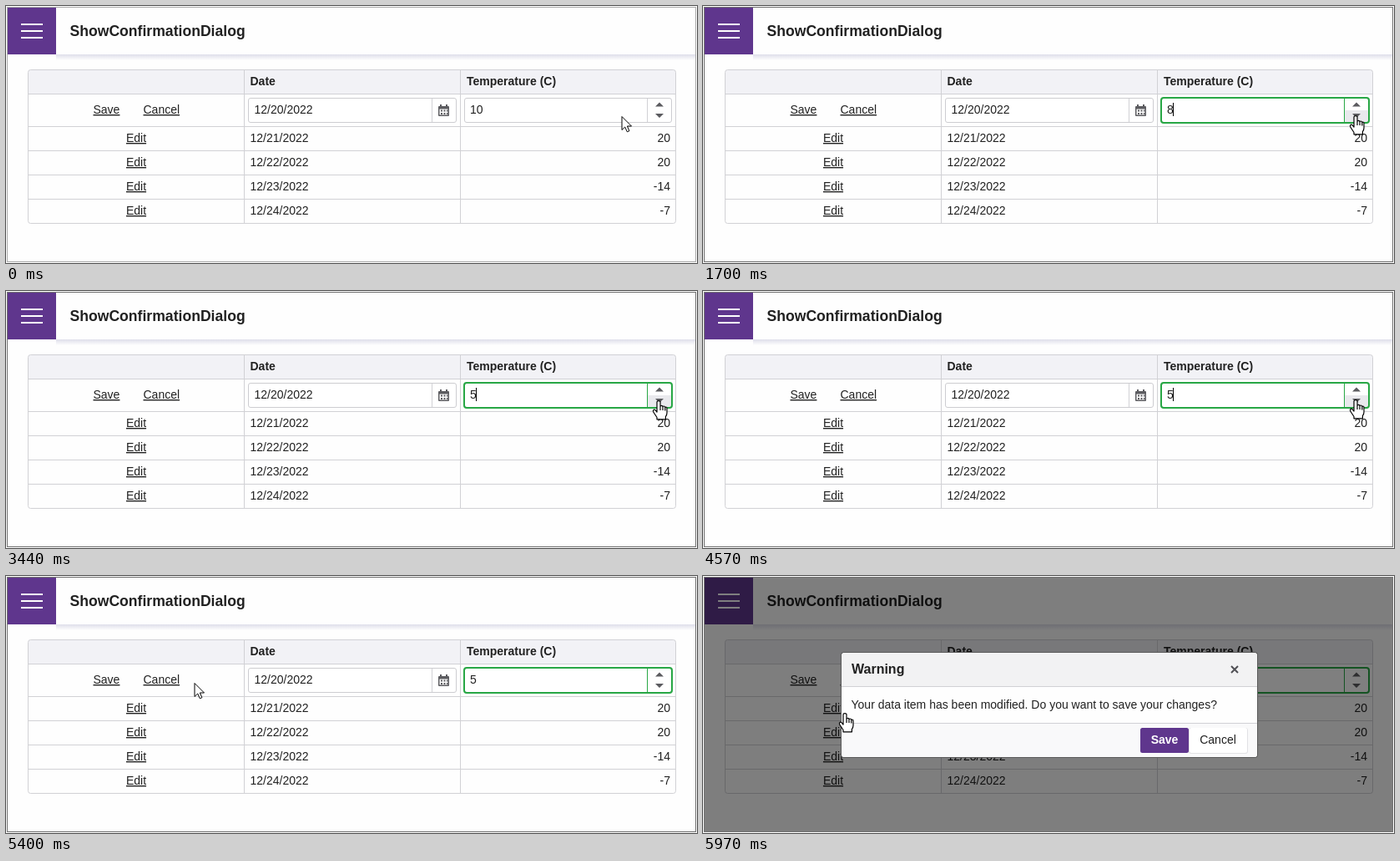
These frames come from a looping animation (828 px wide and 308 px high, 8 s). An HTML page:

```html
<!DOCTYPE html>
<html lang="en">
<head>
<meta charset="utf-8">
<title>ShowConfirmationDialog</title>
<style>
  html, body { margin: 0; width: 100%; height: 100%; overflow: hidden; background: #fff; }
  svg { display: block; }
  text { font: 14px "Liberation Sans", Arial, sans-serif; fill: #212121; white-space: pre; }
  .bold { font-weight: bold; }
  .link { text-decoration: underline; }
  .mid { text-anchor: middle; }
  .end { text-anchor: end; }
  .crisp { shape-rendering: crispEdges; }
  .line { fill: none; stroke: #d1d1d5; }
  .box { fill: #fff; stroke: #cdcdd1; }
  .icon { fill: #5c5c60; }
  .pointer { fill: #fff; stroke: #000; stroke-linejoin: round; }
</style>
</head>
<body>
<svg width="828" height="308" viewBox="0 0 828 308">
  <defs>
    <linearGradient id="shade" x2="0" y2="1">
      <stop offset="0" stop-color="#dedeea"/>
      <stop offset="1" stop-color="#dedeea" stop-opacity="0"/>
    </linearGradient>
  </defs>

  <rect id="frame" class="crisp" x="1.5" y="1.5" width="825" height="305" fill="#fefefe" stroke="#aaa"/>

  <!-- top bar -->
  <rect x="60" y="58" width="766" height="7" fill="url(#shade)"/>
  <rect x="2" y="2" width="58" height="56" fill="#5f368d"/>
  <path class="crisp" d="M18 22H44M18 30H44M18 38H44" stroke="#fff" stroke-width="2"/>
  <text class="bold" x="76.5" y="36" style="font-size:17.6px">ShowConfirmationDialog</text>

  <!-- grid -->
  <path d="M26.5 105V79.5Q26.5 76.5 29.5 76.5H799.5Q802.5 76.5 802.5 79.5V105Z" fill="#f2f2f6"/>
  <rect class="line" x="26.5" y="76.5" width="776" height="184" rx="3"/>
  <path class="line crisp" d="M27 105.5H802M27 144.5H802M27 173.5H802M27 202.5H802M27 231.5H802M285.5 77V260M544.5 77V260"/>
  <text class="bold" x="292.5" y="95">Date</text>
  <text class="bold" x="552" y="95">Temperature (C)</text>
  <g id="rows"></g>

  <!-- edit row -->
  <text class="link" x="104.5" y="129">Save</text>
  <text class="link" x="164.5" y="129">Cancel</text>
  <rect class="box" x="290.5" y="110.5" width="249" height="29" rx="2.5"/>
  <path class="line crisp" d="M510.5 111V139"/>
  <text x="297.5" y="129">12/20/2022</text>
  <g class="icon">
    <path d="M520 118h2v2h5v-2h2v2h1q1 0 1 1v10q0 1-1 1h-11q-1 0-1-1v-10q0-1 1-1h1z"/>
    <path fill="#fff" d="M519.5 123.5h10v7h-10z"/>
    <path d="M521 124.5h2v2h-2zm3.5 0h2v2h-2zm3.5 0h1.5v2h-1.5zM521 128h2v2h-2zm3.5 0h2v2h-2zm3.5 0h1.5v2h-1.5z"/>
  </g>
  <rect class="box" x="549.5" y="110.5" width="248" height="29" rx="2.5"/>
  <path id="hover" d="M769 125H797V137Q797 139 795 139H769Z" fill="#e9e9ed"/>
  <path class="line crisp" d="M768.5 111V139"/>
  <g id="focus" fill="none" stroke="#28a745">
    <rect x="549" y="110" width="249" height="30" rx="3" stroke-width="2"/>
    <path class="crisp" d="M768.5 111V139"/>
  </g>
  <path class="icon" d="M778 120.5L783 115.5L788 120.5ZM778 129L783 134L788 129Z"/>
  <text id="value" x="556" y="129">10</text>
  <rect id="caret" class="crisp" x="563" y="116" width="1" height="16" fill="#000"/>

  <!-- confirmation -->
  <g id="dialog">
    <rect x="2" y="2" width="824" height="304" opacity=".5"/>
    <rect x="165" y="91" width="500" height="127" rx="4" fill="#5b5b5b"/>
    <rect x="166" y="92" width="498" height="125" rx="3.5" fill="#fefefe"/>
    <path d="M166 132V95.5Q166 92 169.5 92H660.5Q664 92 664 95.5V132Z" fill="#f2f2f3"/>
    <path d="M166 177H664V213.5Q664 217 660.5 217H169.5Q166 217 166 213.5Z" fill="#f9f9fa"/>
    <path class="line crisp" d="M166 132.5H664M166 176.5H664"/>
    <text class="bold" x="178" y="117" style="font-size:16px">Warning</text>
    <path d="M633 108L641 116M641 108L633 116" stroke="#505054" stroke-width="2"/>
    <text x="177.5" y="159">Your data item has been modified. Do you want to save your changes?</text>
    <rect x="524" y="182" width="58" height="30" rx="2.5" fill="#5f368d"/>
    <text class="bold mid" x="553" y="201" style="fill:#fff">Save</text>
    <rect x="582" y="182" width="71" height="31" rx="3" fill="#e2e2e5"/>
    <rect x="583" y="182" width="69" height="30" rx="2.5" fill="#fff"/>
    <text class="mid" x="617" y="201">Cancel</text>
  </g>

  <g id="cursor" class="pointer">
    <path id="arrow" d="M0 .5V16.5L3.7 13L6.3 18.8L8.9 17.7L6.4 12H11.5Z"/>
    <path id="hand" stroke-width="1.2" d="M-2 14V2Q-2 .6 0 .6T2 2V7.5Q2 6.3 3.5 6.3T5 8Q5 7 6.4 7T7.8 9Q7.8 8 8.9 8T10 9.8V15Q10 17.5 8.4 19.5V22.8H-2V20.5L-6.3 14Q-7 12-5.8 11.3T-3.3 12.4ZM2 7.5V12M5 8V12M7.8 9V12.5"/>
  </g>
</svg>
<script>
  const $ = id => document.getElementById(id);
  const show = (id, on) => $(id).style.display = on ? "" : "none";

  $("rows").innerHTML = [20, 20, -14, -7].map((temp, i) => {
    const y = 163 + 29 * i;
    return `<text class="link mid" x="156" y="${y}">Edit</text>
      <text x="292.5" y="${y}">12/${21 + i}/2022</text>
      <text class="end" x="796" y="${y}">${temp}</text>`;
  }).join("");
  const edit = $("rows").firstElementChild;

  // All times below are ticks, 30 per second
  const LOOP = 240, OPEN = 179;
  const clicks = [35, 51, 69, 86, 103];
  const caretOn = [[35, 68], [69, 102], [103, 120], [136, 152], [168, 175]];
  const path = [
    [14, 738, 132], [18, 750, 123], [22, 768, 126], [26, 782, 131],
    [136, 782, 131], [141, 748, 123], [152, 420, 105], [160, 254, 118], [169, 170, 164]
  ];

  function slope(i, axis) {
    const a = path[i - 1], p = path[i], b = path[i + 1];
    if (!a || !b || a[1] === p[1] || b[1] === p[1]) return 0;
    return (b[axis] - a[axis]) / (b[0] - a[0]);
  }

  // Smooth Hermite curve through the path points
  function position(k, axis) {
    const last = path.length - 1;
    if (k <= path[0][0]) return path[0][axis];
    if (k >= path[last][0]) return path[last][axis];
    const i = path.findIndex(p => p[0] > k) - 1;
    const p = path[i], q = path[i + 1], d = q[0] - p[0];
    const s = (k - p[0]) / d, r = 1 - s;
    return Math.round(
      p[axis] * (1 + 2 * s) * r * r + q[axis] * s * s * (3 - 2 * s) +
      d * s * r * (slope(i, axis) * r - slope(i + 1, axis) * s));
  }

  function draw(k) {
    const x = position(k, 1), y = position(k, 2);
    const onSpin = x >= 769, onEdit = x <= 172;

    $("cursor").setAttribute("transform", `translate(${x} ${y})`);
    show("arrow", !onSpin && !onEdit);
    show("hand", onSpin || onEdit);
    show("hover", onSpin);
    edit.style.fill = onEdit && k < OPEN ? "#5f368d" : "";

    $("frame").setAttribute("stroke", k < 35 ? "#aaa" : "#707070");
    $("focus").style.opacity = k < 35 ? 0 : k < 37 ? 0.4 : k < 38 ? 0.8 : 1;
    $("value").textContent = 10 - clicks.filter(c => k >= c).length;
    show("caret", caretOn.some(([a, b]) => k >= a && k < b));
    show("dialog", k >= OPEN);
  }

  function tick() {
    draw(Math.floor(performance.now() * 0.03) % LOOP);
    requestAnimationFrame(tick);
  }
  tick();
</script>
</body>
</html>
```
